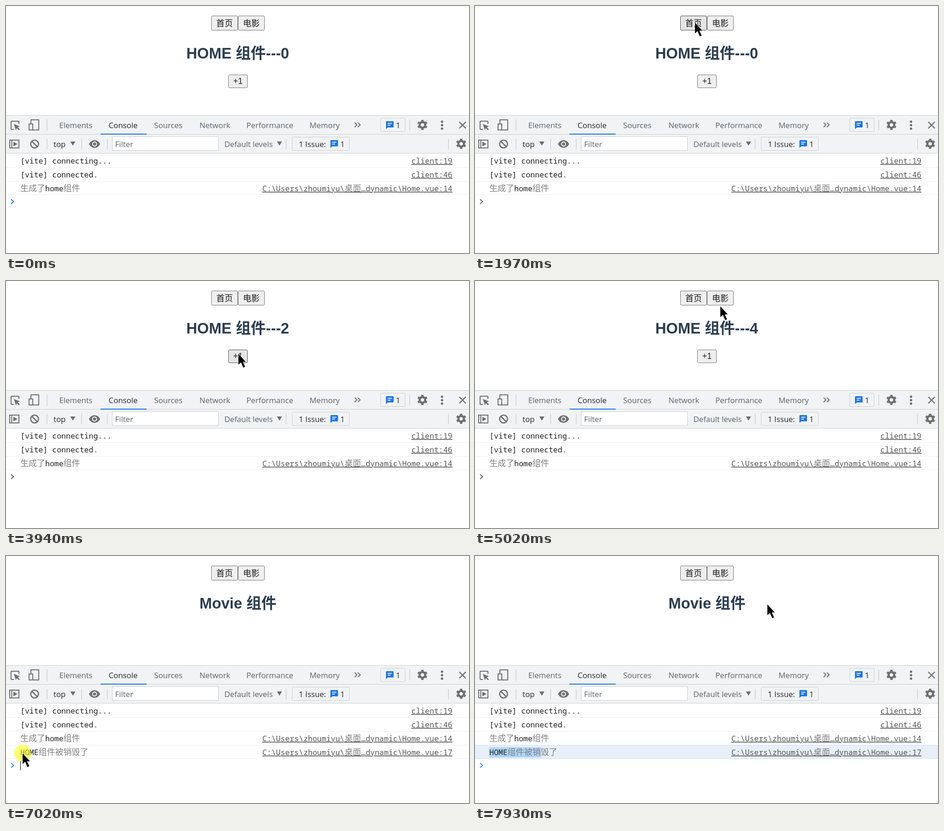
These frames come from a looping animation (1004x536 px, 8 s). An HTML page:

```html
<!DOCTYPE html>
<html lang="zh">
<head>
<meta charset="utf-8">
<title>Dynamic components</title>
<style>
html, body { margin: 0; width: 100%; height: 100%; overflow: hidden; background: #fff; }
svg { display: block; }
text { white-space: pre; }
.ui { font: 16.8px "Open Sans", "Noto Sans", sans-serif; fill: #5f6368; }
.dark { fill: #26282b; }
.mid { text-anchor: middle; }
.btn rect { fill: #efefef; stroke: #767676; }
.btn text { font: 18px "Liberation Sans", "Noto Sans CJK SC", sans-serif; text-anchor: middle; fill: #1c1c1c; }
.title { font: bold 32.7px "Liberation Sans", "Noto Sans CJK SC", sans-serif; fill: #2c3e50; }
.log { font: 16.5px "Noto Sans Mono", "Noto Sans CJK SC", monospace; fill: #222; }
.cjk { font: 300 18px "Noto Sans CJK SC", sans-serif; fill: #808080; }
.link { text-anchor: end; fill: #565656; text-decoration: underline; }
.line { stroke: #cacdd1; }
.row { stroke: #f0f0f0; }
.icon { fill: none; stroke: #6e6e6e; stroke-width: 2; }
.solid { fill: #6e6e6e; }

/* 1% of the loop is 80 ms */
.anim { animation: 8s step-end infinite; }
#homeBtn { animation-name: homeHover; }
#movieBtn { animation-name: movieHover; }
#plusBtn { animation-name: plusHover; }
#count { animation-name: count; }
.before { animation-name: before; }
.after { animation-name: after; }
#prompt { animation-name: prompt; }
#picked { animation-name: picked; }
#selection { animation-name: selection; }
#caret { animation-name: caret; }
#pointer { animation-name: pointer; }
#press { animation-name: press; }

@keyframes homeHover {
  0%, 29.625% { fill: #efefef; stroke: #767676; }
  22.125% { fill: #e5e5e5; stroke: #4f4f4f; }
}
@keyframes movieHover {
  0%, 36.5%, 70.375% { fill: #efefef; stroke: #767676; }
  29.625%, 63.625% { fill: #e5e5e5; stroke: #4f4f4f; }
}
@keyframes plusHover {
  0%, 58.375% { fill: #efefef; stroke: #767676; }
  40% { fill: #e5e5e5; stroke: #4f4f4f; }
}
@keyframes count {
  0% { transform: none; }
  43.75% { transform: translateY(-40px); }
  49.25% { transform: translateY(-80px); }
  52.5% { transform: translateY(-120px); }
  57.5% { transform: translateY(-160px); }
}
@keyframes before { 0% { visibility: visible; } 67%, 100% { visibility: hidden; } }
@keyframes after { 0% { visibility: hidden; } 67%, 100% { visibility: visible; } }
@keyframes prompt {
  0% { transform: none; stroke: #2a7de1; }
  9% { transform: none; stroke: #6e6e6e; }
  67%, 100% { transform: translateY(30px); stroke: #4299dd; }
}
@keyframes picked { 0% { visibility: hidden; } 89.5%, 100% { visibility: visible; } }
@keyframes selection {
  0% { transform: scaleX(0); }
  88.625% { transform: scaleX(.09); }
  89.5% { transform: scaleX(.18); }
  90.375% { transform: scaleX(.36); }
  91.25% { transform: scaleX(.52); }
  92.125% { transform: scaleX(.84); }
  93%, 100% { transform: scaleX(1); }
}
@keyframes caret { 0%, 89.5% { visibility: hidden; } 87% { visibility: visible; } }
@keyframes press {
  0%, 43.75%, 49.25%, 52.5%, 57.5%, 67%, 93.875% { visibility: hidden; }
  42.5%, 47.625%, 50.875%, 55%, 65.375%, 87% { visibility: visible; }
}
@keyframes pointer {
  0% { transform: translate(520px, 570px); }
  8.125% { transform: translate(520px, 570px); animation-timing-function: steps(4); }
  11.625% { transform: translate(650px, 360px); animation-timing-function: steps(3); }
  14.25% { transform: translate(690px, 200px); animation-timing-function: steps(3); }
  16.875% { transform: translate(575px, 150px); animation-timing-function: steps(2); }
  18.625% { transform: translate(489px, 70px); animation-timing-function: steps(7); }
  24.625%, 27% { transform: translate(477px, 36px); }
  27% { animation-timing-function: steps(6); }
  32.25%, 34.75% { transform: translate(532px, 36px); }
  34.75% { animation-timing-function: steps(7); }
  41%, 57.5% { transform: translate(504px, 158px); }
  57.5% { animation-timing-function: steps(6); }
  62.75% { transform: translate(532px, 55px); animation-timing-function: steps(2); }
  64.5%, 69.5% { transform: translate(532px, 37px); }
  69.5% { animation-timing-function: steps(2); }
  71.25% { transform: translate(500px, 120px); animation-timing-function: steps(1); }
  72.125% { transform: translate(450px, 215px); animation-timing-function: steps(2); }
  73.875% { transform: translate(316px, 333px); animation-timing-function: steps(7); }
  80% { transform: translate(81px, 436px); animation-timing-function: steps(6); }
  85.25%, 87.75% { transform: translate(36px, 428px); }
  87.75% { animation-timing-function: steps(3); }
  90.375% { transform: translate(70px, 428px); animation-timing-function: steps(3); }
  93%, 93.875% { transform: translate(143px, 421px); }
  93.875% { animation-timing-function: steps(6); }
  99.125%, 100% { transform: translate(634px, 105px); }
}
</style>
</head>
<body>
<svg width="1004" height="536" viewBox="0 0 1004 536">
  <defs>
    <g id="gear" fill="none" stroke="#6e6e6e">
      <circle r="6.1" stroke-width="4.6"/>
      <circle r="9.3" stroke-width="3.4" pathLength="12" stroke-dasharray="1" stroke-dashoffset="-.5"/>
    </g>
    <g id="chat">
      <path fill="#1a73e8" d="M1.5 0H15a1.5 1.5 0 0 1 1.5 1.5V12a1.5 1.5 0 0 1-1.5 1.5H4L0 17V1.5A1.5 1.5 0 0 1 1.5 0Z"/>
      <path stroke="#fff" stroke-width="1.6" d="M3.5 4.6H13M3.5 8.6H10"/>
    </g>
    <path id="drop" class="solid" d="M0 0H11L5.5 9Z"/>
  </defs>

  <!-- page -->
  <g class="btn">
    <rect id="homeBtn" class="anim" x="445.5" y="21.5" width="57" height="31" rx="2.5"/>
    <text x="474" y="44">首页</text>
    <rect id="movieBtn" class="anim" x="503.5" y="21.5" width="57" height="31" rx="2.5"/>
    <text x="532" y="44">电影</text>
  </g>
  <g class="anim before">
    <text class="title" x="391" y="114">HOME 组件---</text>
    <svg x="595" y="85" width="24" height="36">
      <g id="count" class="anim title">
        <text x=".8" y="29">0</text>
        <text x=".8" y="69">1</text>
        <text x=".8" y="109">2</text>
        <text x=".8" y="149">3</text>
        <text x=".8" y="189">4</text>
      </g>
    </svg>
    <g class="btn">
      <rect id="plusBtn" class="anim" x="482.5" y="149.5" width="41" height="28" rx="2.5"/>
      <text x="503" y="169">+1</text>
    </g>
  </g>
  <text class="title mid anim after" x="503" y="114">Movie 组件</text>

  <!-- toolbars -->
  <rect y="237" width="1004" height="83" fill="#f1f3f4"/>
  <path class="line" d="M0 237.5H1004M0 278.5H1004M0 319.5H1004"/>
  <path class="line" stroke-width="1.3" d="M89 246V271M875.5 247V270M89 288V311M164 288V311M219.5 288V311M607.5 288V311M959.5 288V311"/>

  <path class="icon" d="M17 268H12a1 1 0 0 1-1-1V251a1 1 0 0 1 1-1H27a1 1 0 0 1 1 1V256"/>
  <path class="solid" d="M17 256L30 261L25.5 263L30 267.5L28 269.5L23.5 265L21.5 269.5Z"/>
  <path class="icon" d="M54 255V247H71V269H58M50 256H58V269H50Z"/>
  <g class="ui mid">
    <text x="151.5" y="265">Elements</text>
    <text class="dark" x="254" y="265">Console</text>
    <text x="352" y="265">Sources</text>
    <text x="453" y="265">Network</text>
    <text x="572" y="265">Performance</text>
    <text x="691" y="265">Memory</text>
  </g>
  <rect x="205" y="277" width="100" height="2" fill="#1a73e8"/>
  <path class="icon" d="M756 253L761 258L756 263M763 253L768 258L763 263"/>
  <rect class="line" x="812.5" y="243.5" width="53" height="29" rx="2" fill="#f1f3f4"/>
  <use href="#chat" x="824" y="250"/>
  <text class="ui dark" x="845.5" y="265">1</text>
  <use href="#gear" x="903" y="258"/>
  <path stroke="#6e6e6e" stroke-width="5.2" stroke-linecap="round" d="M945.5 251h0M945.5 258.5h0M945.5 266h0"/>
  <path class="icon" style="stroke-width:2.4" d="M983 251.5L997 265.5M997 251.5L983 265.5"/>

  <path class="icon" d="M8 291H28V308H8ZM12.5 291V308"/>
  <path class="solid" d="M16 294.5L25 299.5L16 304.5Z"/>
  <g class="icon" style="stroke-width:2.6"><circle cx="62" cy="299.5" r="8.5"/><path d="M56 293.5L68 305.5"/></g>
  <text class="ui dark" x="103" y="306">top</text>
  <use href="#drop" x="139.5" y="294"/>
  <path class="solid" d="M180 299.5C185 288.5 199 288.5 204 299.5C199 310.5 185 310.5 180 299.5Z"/>
  <circle cx="192" cy="299.5" r="5.4" fill="#f1f3f4"/>
  <circle class="solid" cx="192" cy="299.5" r="3.3"/>
  <rect class="line" x="230.5" y="283.5" width="230" height="30" fill="#fff"/>
  <text class="ui" x="236.5" y="306">Filter</text>
  <text class="ui" x="473.5" y="306">Default levels</text>
  <use href="#drop" x="587.5" y="294"/>
  <rect class="line" x="620.5" y="284.5" width="124" height="29" rx="2" fill="#f1f3f4"/>
  <text class="ui dark" x="635" y="306">1 Issue:</text>
  <use href="#chat" x="703.5" y="291"/>
  <text class="ui dark" x="725" y="306">1</text>
  <use href="#gear" x="987" y="299"/>

  <!-- console -->
  <path class="row" d="M0 350.5H1004M0 380.5H1004"/>
  <path class="row anim before" d="M0 409.5H1004"/>
  <path class="row anim after" d="M0 410.5H1004M0 439.5H1004"/>
  <g id="picked" class="anim">
    <rect y="410" width="1004" height="30" fill="#e9eff8"/>
    <path stroke="#cfdff2" d="M0 410.5H1004M0 439.5H1004"/>
  </g>
  <g transform="translate(31 415)">
    <rect id="selection" class="anim" width="112" height="22" fill="#afd6fb"/>
  </g>
  <g class="log">
    <text x="31" y="342">[vite] connecting...</text>
    <text class="link" x="968" y="342">client:19</text>
    <text x="31" y="372">[vite] connected.</text>
    <text class="link" x="968" y="372">client:46</text>
    <text x="31" y="402"><tspan class="cjk">生成了</tspan>home<tspan class="cjk">组件</tspan></text>
    <text class="link" x="968" y="402">C:\Users\zhoumiyu\<tspan class="cjk">桌面</tspan>…dynamic\Home.vue:14</text>
    <g class="anim after">
      <text x="31" y="432">HOME<tspan class="cjk">组件被销毁了</tspan></text>
      <text class="link" x="968" y="432">C:\Users\zhoumiyu\<tspan class="cjk">桌面</tspan>…dynamic\Home.vue:17</text>
    </g>
  </g>
  <path id="prompt" class="anim" fill="none" stroke-width="2.2" d="M11 419.5L16.5 424.5L11 429.5"/>
  <path id="caret" class="anim" stroke="#000" d="M31.5 444V465"/>

  <g id="pointer" class="anim">
    <circle id="press" class="anim" r="18.5" fill="#ff0" fill-opacity=".55"/>
    <path stroke="#fff" stroke-width="1.2" paint-order="stroke" d="M0 0V23.5L5.5 18.5L10.5 30L14.5 28L9.5 17.5H16Z"/>
  </g>
</svg>
</body>
</html>
```
